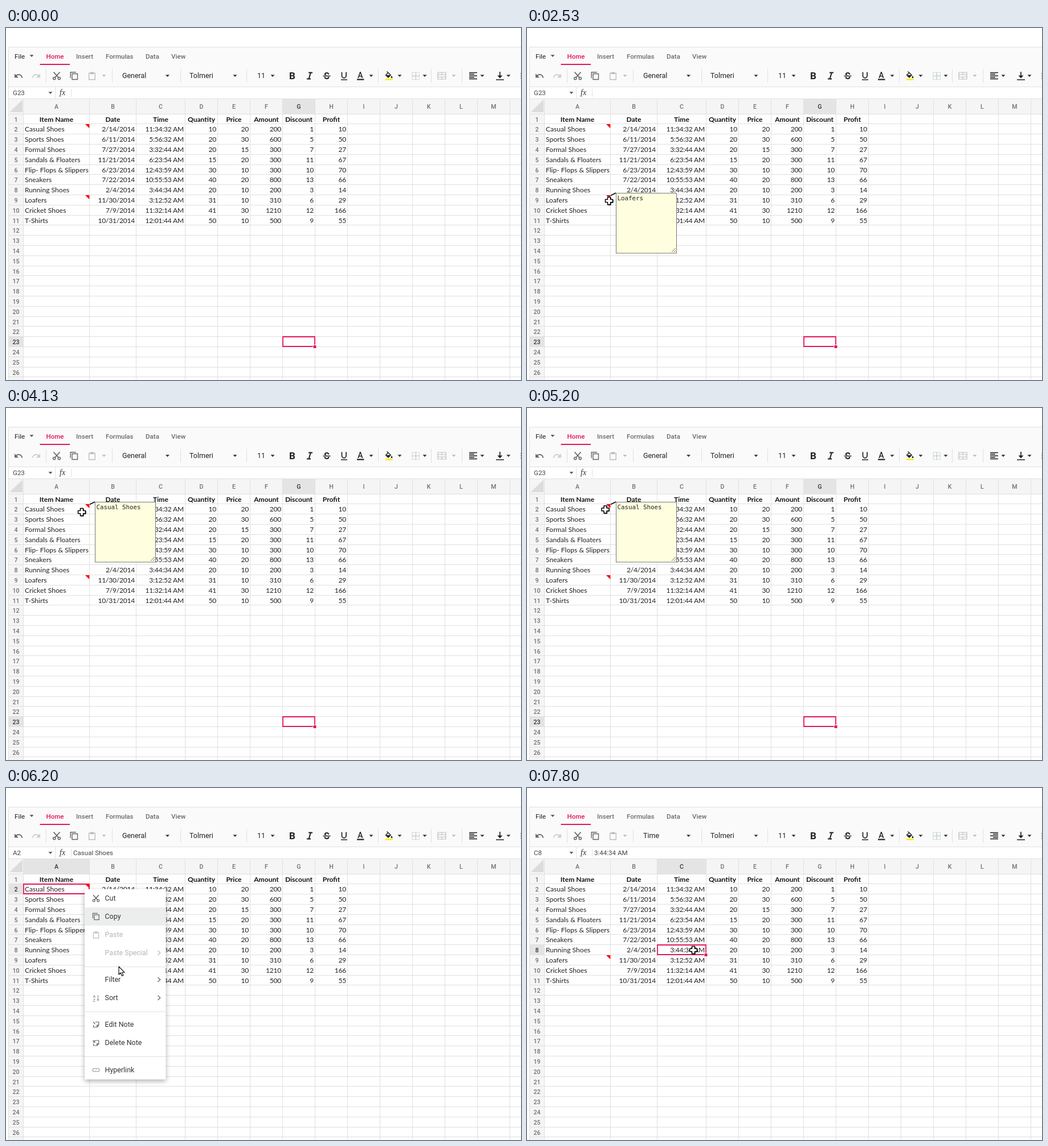
Write an HTML page that moves like this. It is 904 by 619 pixels and loops after 8000 ms.

```html
<!DOCTYPE html>
<html lang="en">
<head>
<meta charset="utf-8">
<title>Spreadsheet notes</title>
<style>
html, body { margin: 0; width: 100%; height: 100%; overflow: hidden; background: #fff; }
svg { display: block; width: 904px; height: 619px; }
text { white-space: pre; font-family: Roboto, sans-serif; }
.ui { font-size: 11.57px; }
.big { font-size: 12.46px; }
.tab { font-size: 11.57px; font-weight: 500; }
.head { font-size: 10.7px; font-weight: 500; }
.cell { font-family: Lato, sans-serif; font-size: 12.1px; }
.num { letter-spacing: -.25px; }
.bold { font-weight: 700; }
.note { font-family: "DejaVu Sans Mono", monospace; font-size: 10.8px; }
.menu { filter: drop-shadow(0 3px 4px rgba(0, 0, 0, .32)); }
</style>
</head>
<body>
<svg id="stage" viewBox="0 0 904 619"></svg>
<script>
const PINK = '#e3165b', LINE = '#e0e0e0', GREY = '#666', OFF = '#bdbdbd', DARK = '#212121';
const LOOP = 8000, TICK = 1000 / 15;
const COLS = [30, 146, 228, 314, ...Array.from({ length: 11 }, (_, i) => 371 + 57 * i)];
const rowY = n => Math.floor(151 + 17.8 * (n - 1));

const DATA = `Item Name|Date|Time|Quantity|Price|Amount|Discount|Profit
Casual Shoes|2/14/2014|11:34:32 AM|10|20|200|1|10
Sports Shoes|6/11/2014|5:56:32 AM|20|30|600|5|50
Formal Shoes|7/27/2014|3:32:44 AM|20|15|300|7|27
Sandals & Floaters|11/21/2014|6:23:54 AM|15|20|300|11|67
Flip- Flops & Slippers|6/23/2014|12:43:59 AM|30|10|300|10|70
Sneakers|7/22/2014|10:55:53 AM|40|20|800|13|66
Running Shoes|2/4/2014|3:44:34 AM|20|10|200|3|14
Loafers|11/30/2014|3:12:52 AM|31|10|310|6|29
Cricket Shoes|7/9/2014|11:32:14 AM|41|30|1210|12|166
T-Shirts|10/31/2014|12:01:44 AM|50|10|500|9|55`.split('\n').map(row => row.split('|'));

// Drawing helpers
const rect = (x, y, w, h, fill, more = '') =>
  `<rect x="${x}" y="${y}" width="${w}" height="${h}" fill="${fill}" ${more}/>`;
const stroke = (d, color, width = 1, more = '') =>
  `<path d="${d}" fill="none" stroke="${color}" stroke-width="${width}" ${more}/>`;
const shape = (d, color, more = '') => `<path d="${d}" fill="${color}" ${more}/>`;
const text = (x, y, str, cls, color = DARK, anchor = 'start') =>
  `<text x="${x}" y="${y}" class="${cls}" fill="${color}" text-anchor="${anchor}">${str.replace(/&/g, '&amp;')}</text>`;
const at = (x, y, content) => `<g transform="translate(${x} ${y})">${content}</g>`;
const caret = (x, y, color = '#333') => shape(`M${x - 3.5} ${y - 1.7}h7l-3.5 3.6z`, color);
const divider = x => stroke(`M${x} 72v24`, LINE);

// Icons, centred on 0,0
const scissors = color => stroke('M-5.5-6.5L3.5 3.5M5.5-6.5L-3.5 3.5', color, 1.8) +
  [-4.3, 4.3].map(x => `<circle cx="${x}" cy="4.6" r="2.1" fill="none" stroke="${color}" stroke-width="1.5"/>`).join('');
const copyIcon = color => stroke('M-3.5-3.5h9.5v10h-9.5zM-6.3 4v-10.3h9.6', color, 1.4);
const pasteIcon = color => stroke('M-5.3-5h10.6v11.3h-10.6z', color, 1.4) + rect(-3, -7, 6, 3.6, color);
const undoIcon = color => stroke('M-4.5 0C-1-3.5 5-2.5 6.3 3.6', color, 1.8) + shape('M-7-3.7v7h7z', color);
const noteIcon = cross => stroke('M-1-4.5H4.8V1.5L1.8 4.5H-4.5V1M4.8 1.2H1.6V4.5', GREY, 1.2) +
  stroke(cross ? 'M-5.3-4.8l4 4m0-4l-4 4' : 'M-5-4.5l3.5 3.5', GREY, 1.3);
const alignIcon = right => stroke([[-6, 14], [-3, 9], [0, 14], [3, 9], [6, 14]].slice(0, 5)
  .map(([y, w]) => `M${right ? 7 - w : -7} ${y * .9}h${w}`).join(''), DARK, 1.5);

function ribbon() {
  const tabs = [['Insert', 123], ['Formulas', 175], ['Data', 245], ['View', 290]];
  return rect(4, 33, 900, 70, '#fafafa') + stroke('M904 33.5H4.5V619', LINE) +
    text(15, 53.5, 'File', 'ui') + caret(45, 49, '#555') +
    text(70.5, 53.5, 'Home', 'tab', PINK) + rect(59.5, 63, 52.5, 2, PINK) +
    tabs.map(([name, x]) => text(x, 53.5, name, 'tab', '#6b6b6b')).join('') +
    at(22, 84, undoIcon(GREY)) + at(53, 84, `<g transform="scale(-1 1)">${undoIcon('#ccc')}</g>`) +
    at(89, 84, scissors(GREY)) + at(119.5, 84, copyIcon(GREY)) + at(151, 84.5, pasteIcon(OFF)) +
    caret(172, 84, OFF) + [70.5, 186.5, 306.5, 422.5, 653.5, 746.5, 800.5].map(divider).join('') +
    caret(283.5, 84) + text(322, 88, 'Tolmeri', 'big') + caret(402, 84) +
    text(441, 88, '11', 'big') + caret(468, 84) +
    text(502.5, 90, 'B', 'bold', DARK, 'middle').replace('<text', '<text font-size="17"') +
    stroke('M531 78.5h7M528 89.5h7M534.8 78.5l-3.2 11', DARK, 2) +
    text(563, 90, 'S', 'bold', DARK, 'middle').replace('<text', '<text font-size="16"') +
    rect(556, 83, 14, 3, '#fafafa') + rect(556.5, 83.7, 13, 1.5, DARK) +
    stroke('M589.5 77.5v6.5a3.8 3.8 0 0 0 7.6 0v-6.5M588 91h11', DARK, 1.7) +
    text(622, 87.5, 'A', 'tab', DARK, 'middle').replace('<text', '<text style="font-size:14px"') +
    rect(616, 89.5, 12.5, 2.2, DARK) + caret(641, 84) +
    at(671, 82, stroke('M-2.5-5.5l6.8 6.3-4.3 4.2-4.4-4.3 4.2-4', DARK, 1.4) +
      shape('M-4.4.7h8.7L0 5zM6 2q3 4 0 4t0-4z', DARK)) +
    rect(666, 89.3, 13, 2.4, '#ffeb00') + caret(691, 84) +
    stroke('M713 78h12.5v12.5H713z', '#c4c4c4', 1, 'stroke-dasharray="2 1"') +
    stroke('M719.3 78v12.5M713 84.2h12.5', '#a5c9b5') + caret(735, 84) +
    stroke('M758 78h14v12h-14zM758 82h14M758 86h14M765 78v4M765 86v4', OFF, 1.2) + caret(786, 84, OFF) +
    caret(836, 84) + stroke('M867 77v9M860 91h14', DARK, 1.7) + shape('M862.5 83.5h9l-4.5 5z', DARK) +
    caret(882, 84) + stroke('M903.5 79v10', '#999', 1, 'stroke-dasharray="2 2"');
}

function formulaBar() {
  return stroke('M4 103.5H904M4 124.5H904M86.5 103v21', LINE) + stroke('M114.5 107v14', LINE) +
    caret(78, 114, '#555') +
    '<text x="94" y="118" font-size="14" font-style="italic" style="font-family:\'Liberation Serif\',serif" fill="#333">fx</text>';
}

function grid() {
  let out = rect(5, 125, 899, 26, '#f5f5f5') + rect(5, 151, 25, 468, '#f5f5f5') + shape('M29 126v22H6.5z', '#dcdcdc');
  let lines = COLS.map(x => `M${x + .5} 125V619`).join('');
  for (let n = 1; n <= 27; n++) lines += `M5 ${rowY(n) + .5}H904`;
  return out + stroke(lines, LINE);
}

function cells() {
  return DATA.map((row, r) => row.map((value, c) => {
    const y = rowY(r + 1) + 14;
    if (!r) return text((COLS[c] + COLS[c + 1]) / 2 + .5, y, value, 'cell bold', '#111', 'middle');
    return c ? text(COLS[c + 1] - 2, y, value, 'cell num', DARK, 'end') : text(33, y, value, 'cell');
  }).join('')).join('');
}

function headers(selCol, selRow) {
  let out = rect(COLS[selCol] + 1, 125, COLS[selCol + 1] - COLS[selCol] - 1, 26, '#e4e4e4') +
    rect(5, rowY(selRow) + 1, 25, 17, '#e4e4e4');
  for (let c = 0; c < 13; c++)
    out += text((COLS[c] + COLS[c + 1]) / 2 + .5, 142, String.fromCharCode(65 + c), 'head', c === selCol ? '#333' : '#707070', 'middle');
  for (let n = 1; n <= 26; n++)
    out += text(17.5, rowY(n) + 13.5, String(n), 'head', n === selRow ? '#333' : '#707070', 'middle');
  return out;
}

function selection(col, row) {
  const x = COLS[col], right = COLS[col + 1], y = rowY(row), bottom = rowY(row + 1);
  return stroke(`M${x + 1} ${y + 1}H${right}V${bottom}H${x + 1}z`, PINK, 1.8) +
    rect(right - 3, bottom - 2.5, 6, 6, PINK, 'stroke="#fff"');
}

const noteMark = row => shape(`M139 ${rowY(row) + 1}h7.3v7.3z`, '#f00');

function note(y, label, anchorY) {
  return stroke(`M147 ${anchorY}L156 ${y}`, '#000', 1.5) +
    rect(156.5, y + .5, 106, 105.5, '#ffffe0', 'stroke="#777"') +
    text(158.5, y + 13, label, 'note') + stroke(`M254 ${y + 104}l7-7M258 ${y + 104}l3-3`, '#777');
}

const MENU = [['Cut', 194], ['Copy', 226], ['Paste', 258, 1], ['Paste Special', 290, 1], ['Filter', 337],
  ['Sort', 369], ['Edit Note', 416], ['Delete Note', 448], ['Hyperlink', 495.5]];
const itemAt = y => MENU.find(([, mid, off]) => !off && Math.abs(y - mid) <= 16);

function menu(active) {
  let out = rect(138, 178, 142.5, 334.5, '#fff', 'rx="1.5" class="menu"');
  if (active) out += rect(138, active[1] - 16, 142.5, 32, '#eceeed');
  out += stroke('M138 314.5h142.5M138 393.5h142.5M138 472.5h142.5', LINE);
  for (const [label, y, off] of MENU) {
    out += text(173.5, y + 4.3, label, 'big', off ? '#b5b5b5' : '#333');
    if (/Special|Filter|Sort/.test(label)) out += stroke(`M266.5 ${y - 4}l4.3 4-4.3 4`, off ? OFF : GREY, 1.3);
  }
  const small = (y, icon) => at(158, y, `<g transform="scale(.88)">${icon}</g>`);
  return out + small(194, scissors(GREY)) + small(226, copyIcon(GREY)) + small(258.5, pasteIcon(OFF)) +
    '<g font-size="7.5" fill="#777"><text x="152.5" y="369">A</text><text x="152.5" y="376">Z</text></g>' +
    stroke('M161.5 364v10m-2-2.3l2 2.3 2-2.3', '#888') +
    at(158, 416, noteIcon(false)) + at(158, 448.5, noteIcon(true)) +
    at(158, 496, stroke('M-1.2 2.7h-2a2.7 2.7 0 0 1 0-5.4h2a2.7 2.7 0 0 1 2.6 2M1.2-2.7h2a2.7 2.7 0 0 1 0 5.4h-2a2.7 2.7 0 0 1-2.6-2', '#999', 1.1));
}

const POINTERS = {
  cross: 'M-2.5-6.5h5v4h4v5h-4v4h-5v-4h-4v-5h4z',
  arrow: 'M0 0V14l3.2-3 2.3 5.4 2.4-1-2.3-5.2h4.4z',
  hand: 'M-2 1.5Q-2 0-.5 0T1 1.5V7Q1 6 2.5 6T4 7.2Q4.3 6.8 5.5 6.9T6.8 8.3Q7 7.8 8.2 8T9.5 9.5V13Q9.5 16 7.5 19H0Q-1.5 16.5-5 12.5Q-6 11-4.8 10.2T-2 12Z'
};
const pointer = (kind, [x, y]) => at(x, y,
  shape(POINTERS[kind], '#fff', `stroke="#000" stroke-width="${kind === 'cross' ? 1.5 : 1.1}" stroke-linejoin="round"`) +
  (kind === 'cross' ? stroke('M3.2-6v3.2M7.2-2v5.2h-4v4h-5.5', '#000', .8) : ''));

// Pointer stops: tick, x, y
const PATH = [[33, 165, 306], [35, 144, 304], [39, 144, 304], [41, 141, 303.5], [57, 141, 303.5],
  [58, 139, 286], [60, 136, 215], [62, 133, 183], [63, 133, 183], [64, 143, 183], [71, 143, 183],
  [72, 137.5, 180], [76, 137.5, 180], [78, 137.5, 178.5], [89, 137.5, 178.5], [90, 146, 190],
  [92, 182, 238], [93, 198, 314], [96, 212, 390], [98, 218, 435], [99, 219, 443],
  [111, 219, 443], [115, 292, 285], [120, 292, 285]];

function pointerAt(k) {
  if (k < 33) {
    const rest = (1 - (k - 21) / 12) ** 2.23;
    return [165 + 582 * rest, 306 + 140 * rest];
  }
  const i = Math.max(1, PATH.findIndex(p => p[0] >= k));
  const [k0, x0, y0] = PATH[i - 1], [k1, x1, y1] = PATH[i], u = (k - k0) / (k1 - k0);
  return [x0 + (x1 - x0) * u, y0 + (y1 - y0) * u];
}

const backdrop = ribbon() + formulaBar() + grid();
const contents = cells();
const stage = document.getElementById('stage');

function draw(k) {
  const [col, row] = k < 81 ? [6, 23] : k < 116 ? [0, 2] : [2, 8];
  const value = DATA[row - 1]?.[col] ?? '';
  const timeFormat = k >= 117, menuOpen = k >= 83 && k < 102;
  let out = backdrop + headers(col, row) + contents +
    text(204, 88, timeFormat ? 'Time' : 'General', 'big') + at(820, 84, alignIcon(timeFormat)) +
    text(12, 118, String.fromCharCode(65 + col) + row, 'ui', '#444') + text(118, 118, value, 'ui', '#444') +
    selection(col, row) + (k < 103 ? noteMark(2) : '') + noteMark(9);
  if (k >= 36 && k < 59) out += note(290, 'Loafers', 294.5);
  if (k >= 62 && k < 81) out += note(165, 'Casual Shoes', 169.5);
  if (menuOpen) out += menu(k > 90 ? itemAt(pointerAt(k - 1)[1]) : null);
  if (k >= 21) {
    const pos = pointerAt(k);
    let kind = k === 58 ? 'hand' : 'cross';
    if (menuOpen && k >= 90) kind = itemAt(pos[1]) ? 'hand' : 'arrow';
    out += pointer(kind, pos);
  }
  stage.innerHTML = out;
}

let shown = -1;
const start = performance.now();
function frame() {
  const t = (performance.now() - start) % LOOP;
  const k = Math.floor((t + 4) / TICK) % 120;
  if (k !== shown) draw(shown = k);
  requestAnimationFrame(frame);
}
frame();
</script>
</body>
</html>
```
